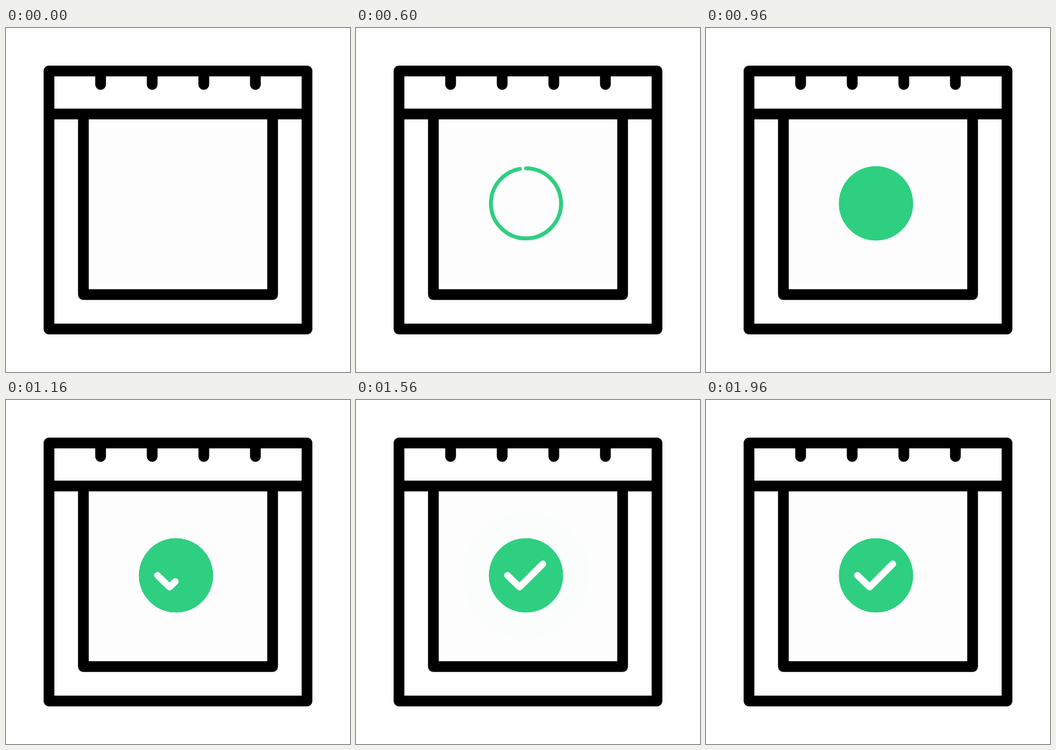
An HTML page for the animation above (2000 ms loop, 512 by 512 pixels).

```html
<!DOCTYPE html>
<html lang="en">
<head>
<meta charset="utf-8">
<title>Calendar check</title>
<style>
  html, body { margin: 0; width: 100%; height: 100%; overflow: hidden; background: #fff; }
  svg { display: block; width: 100%; height: 100%; }
  path, #ring { fill: none; stroke-linecap: round; stroke-linejoin: round; }
</style>
</head>
<body>
<svg viewBox="0 0 512 512">
  <rect x="123" y="136" width="266" height="248" fill="#fdfdfd"/>
  <g stroke="#000" stroke-width="16">
    <path d="M64 64H448V448H64Z M64 128H448"/>
    <path d="M115.2 128V396.8H396.8V128"/>
    <path d="M140.8 64V84 M217.6 64V84 M294.4 64V84 M371.2 64V84"/>
  </g>
  <g transform="translate(253 261)">
    <circle id="halo" fill="#2ecf80"/>
    <g id="badge">
      <circle id="disc" r="55.2" fill="#2ecf80"/>
      <circle id="ring" r="52.2" stroke="#2ecf80" stroke-width="5.8" pathLength="1" transform="rotate(-90)"/>
    </g>
    <path id="check" d="M-27.5 0L-9.5 17.5L25 -17" stroke="#fff" stroke-width="10" pathLength="1"/>
  </g>
</svg>
<script>
const LOOP = 2000, STEP = 40;
const [halo, badge, disc, ring, check] =
  ['halo', 'badge', 'disc', 'ring', 'check'].map(id => document.getElementById(id));

const progress = (t, from, to) => Math.min(1, Math.max(0, (t - from) / (to - from)));
const smooth = p => p * p * (3 - 2 * p);

function trim(shape, amount) {
  shape.style.visibility = amount > 0 ? 'visible' : 'hidden';
  shape.setAttribute('stroke-dasharray', `${amount} 2`);
}

function draw(t) {
  // The ring stops just short of closing.
  trim(ring, 0.983 * smooth(progress(t, 0, 640)));
  const swell = smooth(progress(t, 600, 760)) - smooth(progress(t, 760, 920));
  badge.setAttribute('transform', `scale(${1 + 0.1 * swell})`);
  disc.setAttribute('opacity', smooth(progress(t, 800, 960)));
  trim(check, smooth(progress(t, 960, 1360)));

  const rest = 1 - progress(t, 1160, 1720);
  halo.setAttribute('r', t > 1160 ? 55 + 43 * (1 - rest * rest) : 0);
  halo.setAttribute('opacity', 0.14 * rest * rest);
}

const start = performance.now();
function tick() {
  const t = (performance.now() - start) % LOOP;
  draw(Math.floor(t / STEP) * STEP);
  requestAnimationFrame(tick);
}
tick();
</script>
</body>
</html>
```
